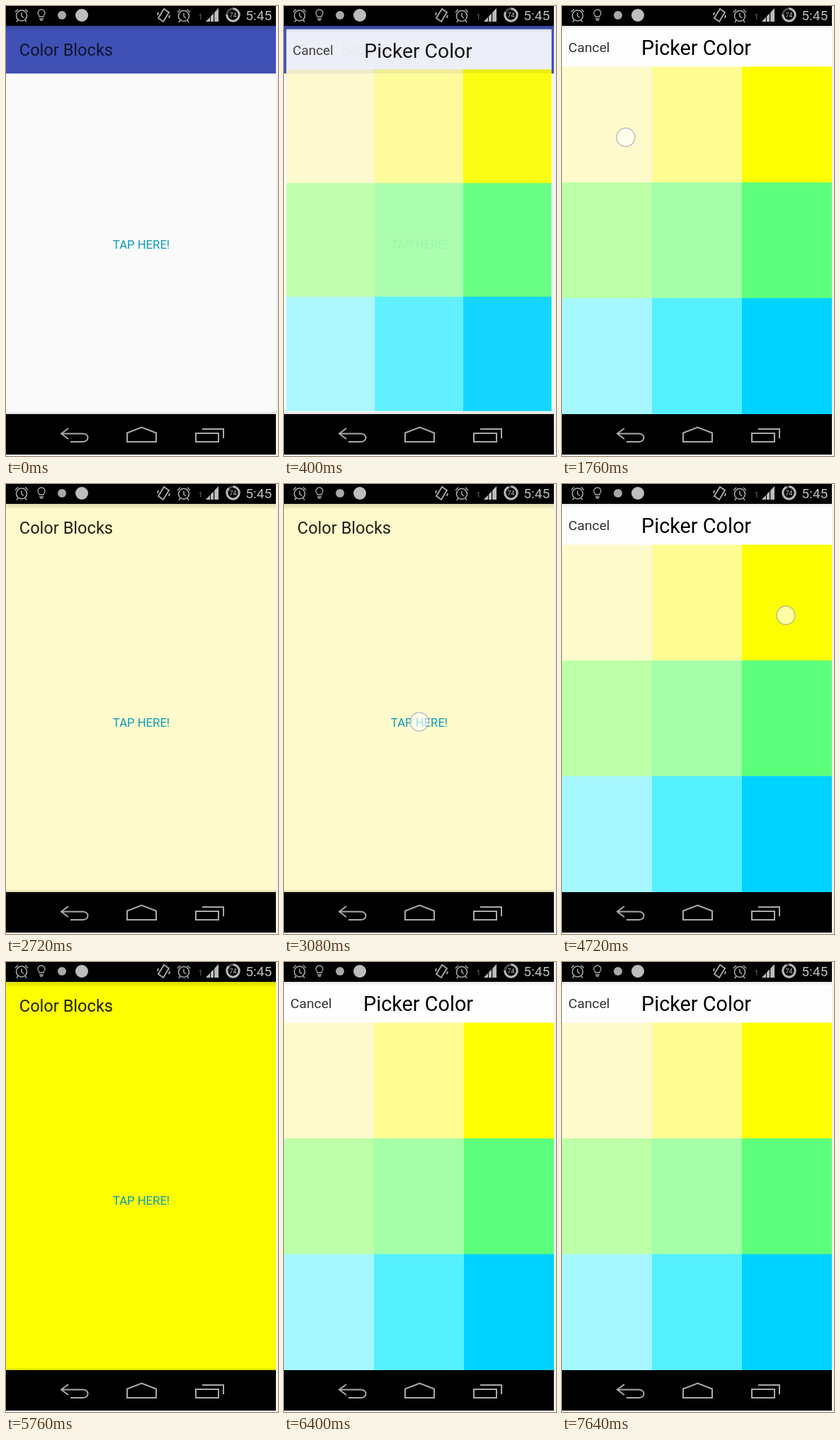
Animation of 384 by 634 pixels, one loop 8 s. Source, as an HTML page with a canvas:

```html
<!DOCTYPE html>
<html lang="en">
<head>
<meta charset="utf-8">
<title>Color picker</title>
<style>
  html, body { margin: 0; width: 100%; height: 100%; overflow: hidden; background: #f1f0f1; }
  canvas { display: block; }
</style>
</head>
<body>
<canvas id="stage" width="384" height="634"></canvas>
<script>
const ctx = document.getElementById('stage').getContext('2d');
const LOOP = 8000, WIDTH = 381, TOP = 28, BOTTOM = 575;
const ICON = '#a9a9a9';
const SWATCHES = [
  ['#fffacb', '#fefc93', '#fdfe00'],
  ['#bdffa8', '#a5ffa8', '#5cff7b'],
  ['#a6f7ff', '#55f0ff', '#00d3ff']
];

const clamp = v => Math.max(0, Math.min(1, v));
const ramp = (t, from, to) => clamp((t - from) / (to - from));
const easeOut = p => 1 - (1 - p) ** 3;
const easeInOut = p => p * p * (3 - 2 * p);
const mix = (a, b, p) => a + (b - a) * p;

function rect(color, x, y, w, h) {
  ctx.fillStyle = color;
  ctx.fillRect(x, y, w, h);
}

function text(string, x, y, size, color, align = 'left') {
  ctx.font = `${size}px Roboto, sans-serif`;
  ctx.textAlign = align;
  ctx.fillStyle = color;
  ctx.fillText(string, x, y);
}

function line(path, color = ICON, width = 1.5) {
  ctx.strokeStyle = color;
  ctx.lineWidth = width;
  ctx.stroke(new Path2D(path));
}

function disc(x, y, r, color) {
  ctx.fillStyle = color;
  ctx.beginPath();
  ctx.arc(x, y, r, 0, Math.PI * 2);
  ctx.fill();
}

function ring(x, y, r, color, width, from = 0, share = 1) {
  ctx.strokeStyle = color;
  ctx.lineWidth = width;
  ctx.beginPath();
  ctx.arc(x, y, r, from, from + share * Math.PI * 2);
  ctx.stroke();
}

function shade(y, h, from, to) {
  const gradient = ctx.createLinearGradient(0, y, 0, y + h);
  gradient.addColorStop(0, `rgba(0,0,0,${from})`);
  gradient.addColorStop(1, `rgba(0,0,0,${to})`);
  rect(gradient, 0, y, WIDTH, h);
}

function alarm(x, y) {
  ring(x, y, 7.5, ICON, 1.6);
  line(`M${x} ${y - 4}v4.5l3 2.5M${x - 9} ${y - 5}l4 -4M${x + 9} ${y - 5}l-4 -4M${x - 5} ${y + 6}l-2 3M${x + 5} ${y + 6}l2 3`);
}

function statusBar(t) {
  rect('#000', 0, 0, WIDTH, TOP);
  alarm(22, 13.5);
  line('M47 15c0 -2 -2 -3 -2 -5a5 5 0 0 1 10 0c0 2 -2 3 -2 5zM47 18h6M48 20h4', ICON, 1.3);
  disc(79, 13, 6, ICON);
  disc(107, 13, 9, '#bdbdbd');
  line('M223 4l7 5l-8 13l-7 -5zM215 9l-1 4M230 17l1 -4', ICON, 1.9);
  alarm(251, 14);
  text('1', 274.5, 19, 10, '#777', 'center');
  ctx.fillStyle = '#bcbcbc';
  ctx.fill(new Path2D('M282 22L300 3V22Z'));
  rect('#000', 288, 3, 1, 19);
  rect('#000', 293, 3, 1.2, 19);
  const charge = 0.76 + 0.06 * (Math.floor(t / 400) % 4);
  ring(320.5, 12.5, 8.7, '#4a4a4a', 3);
  ring(320.5, 12.5, 8.7, '#b5b5b5', 3, -Math.PI / 2, charge);
  text('74', 320.5, 16, 9, '#c4c4c4', 'center');
  text('5:45', 338.3, 20, 19.2, '#bdbdbd');
}

function navBar() {
  rect('#000', 0, BOTTOM, WIDTH, 57);
  line('M88 595L78 602.5L88 610M78 602.5H108C118 602.5 118 614 108 614H91', ICON, 2);
  line('M171 614V601.500L191.5 593.5L212 601.500V614Z', ICON, 2);
  line('M268 602H300V614H268ZM277 596H307V609', ICON, 2);
}

function mainScreen(t) {
  const tint = t < 1960 ? null : t < 4960 ? SWATCHES[0][0] : SWATCHES[0][2];
  rect(tint || '#fafafa', 0, TOP, WIDTH, BOTTOM - TOP);
  if (!tint) {
    rect('#3f51b5', 0, TOP, WIDTH, 67);
    shade(95, 2, 0.12, 0);
  }
  shade(TOP, 8, 0.14, 0);
  shade(BOTTOM - 4, 4, 0, 0.14);
  text('Color Blocks', 18.8, 70, 23.6, tint ? '#202016' : '#10142d');
  text('TAP HERE!', 191, 342, 16.7, '#0c9cba', 'center');
}

function pickerScreen(openness) {
  if (!openness) return;
  const scale = mix(0.8, 1, openness), cx = WIDTH / 2, cy = (TOP + BOTTOM) / 2;
  ctx.save();
  ctx.globalAlpha = openness;
  ctx.translate(cx, cy);
  ctx.scale(scale, scale);
  ctx.translate(-cx, -cy);
  rect('#fefefe', 0, TOP, WIDTH, 58);
  shade(TOP, 6, 0.08, 0);
  text('Cancel', 9.1, 65, 19.2, '#333');
  text('Picker Color', 112, 69, 28.8, '#000');
  // Cells overlap by one pixel so that their soft edges blend with each other.
  SWATCHES.forEach((row, j) => row.forEach((color, i) =>
    rect(color, i * 127, 85.5 + j * 163, 127, 164)));
  ctx.restore();
}

function opennessAt(t) {
  if (t < 1960) return easeOut(ramp(t, 200, 560));
  if (t < 3000) return 1 - easeOut(ramp(t, 1960, 2360));
  if (t < 4960) return easeOut(ramp(t, 3120, 3440));
  if (t < 6000) return 1 - easeOut(ramp(t, 4960, 5360));
  return ramp(t, 6080, 6160);
}

// Returns [x, y, opacity] of the finger marker.
function touchAt(t) {
  if ((t >= 40 && t < 200) || (t >= 3080 && t < 3200)) return [191, 335, 1];
  if (t >= 1160 && t < 1560) return [70, 162, ramp(t, 1120, 1360)];
  if (t >= 1560 && t < 1960) return [90, 185, 1];
  if (t >= 4600 && t < 4960) return [316, 185, ramp(t, 4560, 4720)];
  if (t >= 6720 && t < 7640) {
    const p = easeInOut(ramp(t, 6720, 7240));
    return [mix(363, 326, p), mix(561, 324, p), 1 - ramp(t, 7540, 7640)];
  }
  return null;
}

function touchMarker(touch) {
  if (!touch) return;
  const [x, y, opacity] = touch;
  ctx.globalAlpha = opacity;
  disc(x, y, 13, 'rgba(255,255,255,.62)');
  ring(x, y, 13, 'rgba(150,150,175,.6)', 1.5);
  ctx.globalAlpha = 1;
}

function draw(t) {
  rect('#f1f0f1', 0, 0, 384, 634);
  ctx.save();
  ctx.beginPath();
  ctx.rect(0, TOP, WIDTH, BOTTOM - TOP);
  ctx.clip();
  mainScreen(t);
  pickerScreen(opennessAt(t));
  touchMarker(touchAt(t));
  ctx.restore();
  statusBar(t);
  navBar();
}

const start = performance.now();
function frame() {
  draw((performance.now() - start) % LOOP);
  requestAnimationFrame(frame);
}
frame();
</script>
</body>
</html>
```
